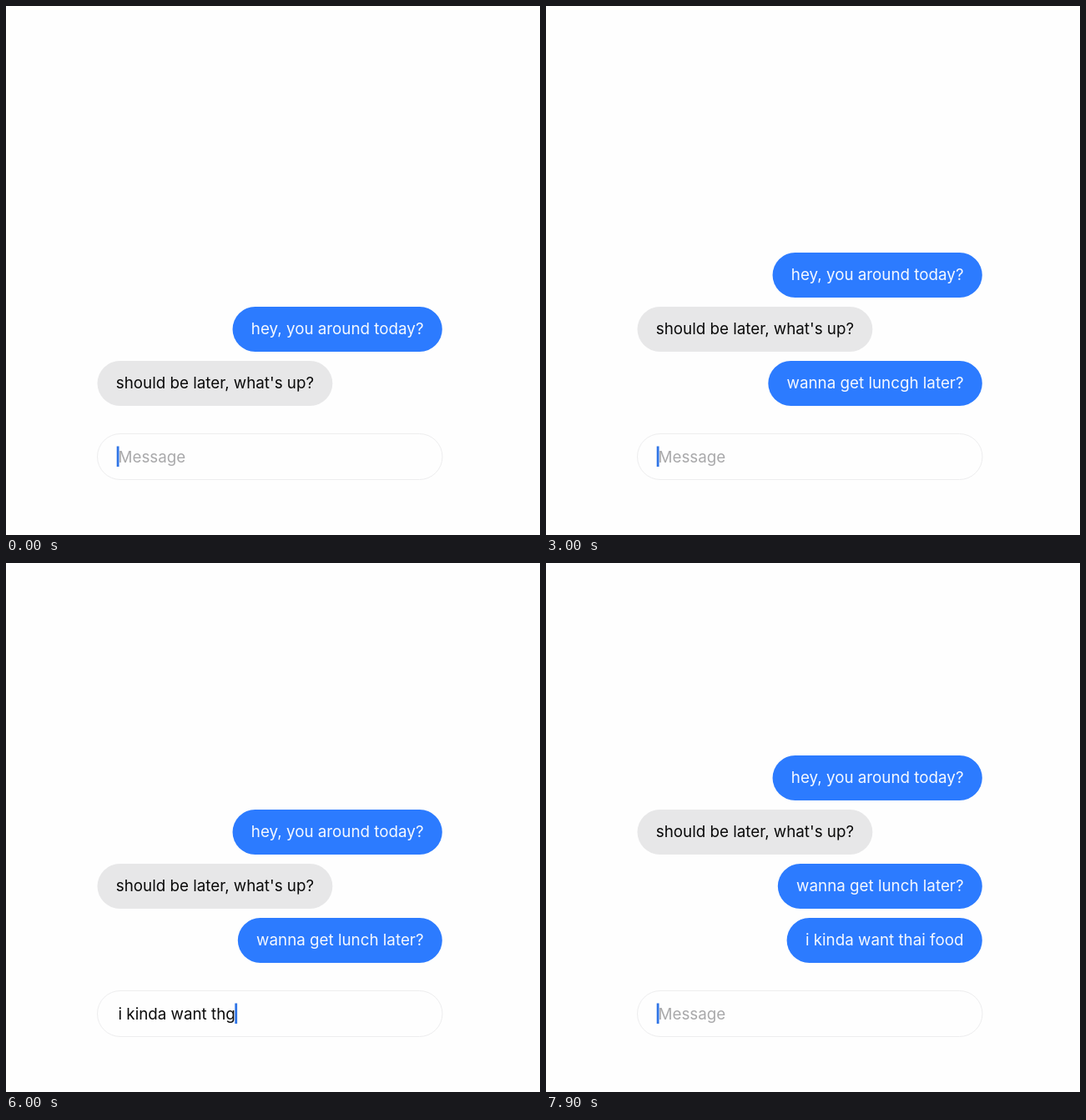
An HTML page with a canvas that plays this animation: 640 px wide and 635 px high, repeating every 8 s.

```html
<!DOCTYPE html>
<html lang="en">
<head>
<meta charset="utf-8">
<title>Chat</title>
<style>
html, body { margin: 0; width: 100%; height: 100%; overflow: hidden; background: #fefefe; }
canvas { display: block; width: 640px; height: 635px; }
</style>
</head>
<body>
<canvas></canvas>
<script>
const W = 640, H = 635, LOOP = 8000;
const LEFT = 109.5, RIGHT = 522.8, PAD = 22.3, BUBBLE_H = 54, ROW = 65, LAST_Y = 426;
const PAPER = 254, BLUE = [44, 123, 255], GREY = [231, 231, 232];
const WHITE = [246, 249, 255], BLACK = [10, 10, 10];
const FONT = '18.8px Inter, "Liberation Sans", sans-serif';

const canvas = document.querySelector('canvas');
const ctx = canvas.getContext('2d');
const dpr = window.devicePixelRatio || 1;
canvas.width = W * dpr;
canvas.height = H * dpr;

// sent / fixed: when a message leaves the input and when its typo is corrected
const messages = [
  { text: 'hey, you around today?', mine: true, sent: -1e4 },
  { text: "should be later, what's up?", sent: -1e4 },
  { text: 'wanna get luncgh later?', mine: true, sent: 2480, fix: 'wanna get lunch later?', fixed: 3850 },
  { text: 'i kinda want thgai food', mine: true, sent: 6680, fix: 'i kinda want thai food', fixed: 7590 }
];

// keys: [time, number of characters]
const typing = [
  { text: messages[2].text, end: 2480, keys: [[200, 1], [1900, 19], [2000, 22], [2190, 22], [2200, 23]] },
  { text: '*lunch', end: 3850, keys: [[3150, 1], [3650, 6]], edit: true },
  { text: messages[3].text, end: 6680, keys: [[4900, 1], [5700, 13], [6000, 16], [6450, 23]] },
  { text: '*thai', end: 7590, keys: [[7100, 1], [7300, 3], [7480, 5]], edit: true }
];

const clamp = v => Math.max(0, Math.min(1, v));
const mix = (a, b, p) => a + (b - a) * p;
const easeOut = p => 1 - (1 - p) ** 3;
const progress = (t, start, length) => clamp((t - start) / length);

// A colour at the given opacity on the page background
const tint = (rgb, alpha) => `rgb(${rgb.map(c => Math.round(mix(PAPER, c, alpha)))})`;

function keyed(keys, t) {
  for (let i = 1; i < keys.length; i++) {
    const [t0, v0] = keys[i - 1], [t1, v1] = keys[i];
    if (t < t1) return mix(v0, v1, progress(t, t0, t1 - t0));
  }
  return keys[keys.length - 1][1];
}

function pill(x, y, w, h) {
  ctx.beginPath();
  ctx.roundRect(x, y, w, h, h / 2);
}

function label(text, x, y, color) {
  ctx.fillStyle = color;
  ctx.fillText(text, x, y);
}

const bubbleWidth = text => ctx.measureText(text).width + 2 * PAD;

function bubble(m, y, alpha, t) {
  const isFixed = m.fix && t >= m.fixed;
  const text = isFixed ? m.fix : m.text;
  let w = bubbleWidth(m.text);
  if (isFixed) w = mix(w, bubbleWidth(m.fix), easeOut(progress(t, m.fixed, 150)));
  const x = m.mine ? RIGHT - w : LEFT;
  ctx.fillStyle = tint(m.mine ? BLUE : GREY, alpha);
  pill(x, y, w, BUBBLE_H);
  ctx.fill();
  label(text, x + PAD, y + 33, tint(m.mine ? WHITE : BLACK, alpha));
}

// Older messages fade back while a correction is typed
function dimming(t) {
  let d = 0;
  for (const s of typing) {
    if (!s.edit) continue;
    d += progress(t, s.keys[0][0], 180) - progress(t, s.end, 300);
  }
  return mix(1, 0.6, d);
}

function drawMessages(t) {
  const dim = dimming(t);
  const shown = messages.filter(m => t >= m.sent);
  let y = LAST_Y + ROW;
  for (let i = shown.length - 1; i >= 0; i--) {
    const m = shown[i], e = easeOut(progress(t, m.sent, 350));
    y -= ROW * e;
    bubble(m, y, i === shown.length - 1 ? e : dim, t);
  }
}

function drawInput(t) {
  pill(109.5, 513.5, 413.5, 55);
  ctx.fillStyle = tint(BLUE, 0);
  ctx.fill();
  ctx.strokeStyle = '#ededee';
  ctx.lineWidth = 1;
  ctx.stroke();

  const s = typing.find(s => t >= s.keys[0][0] && t < s.end);
  let caret = 132.7;
  if (s) {
    const typed = s.text.slice(0, Math.floor(keyed(s.keys, t) + 1e-6));
    label(typed, 134.5, 548, tint(BLACK, 1));
    caret = 134 + ctx.measureText(typed).width;
  } else {
    label('Message', 134.5, 548, '#a9a9ab');
  }
  if (!s || !s.edit) {
    ctx.fillStyle = '#2f74e6';
    ctx.fillRect(caret, 528.5, 2.8, 24.5);
  }
}

function draw(t) {
  ctx.setTransform(dpr, 0, 0, dpr, 0, 0);
  ctx.fillStyle = tint(BLUE, 0);
  ctx.fillRect(0, 0, W, H);
  ctx.font = FONT;
  drawMessages(t);
  drawInput(t);
}

const start = performance.now();
function tick() {
  draw((performance.now() - start) % LOOP);
  requestAnimationFrame(tick);
}
tick();
</script>
</body>
</html>
```
